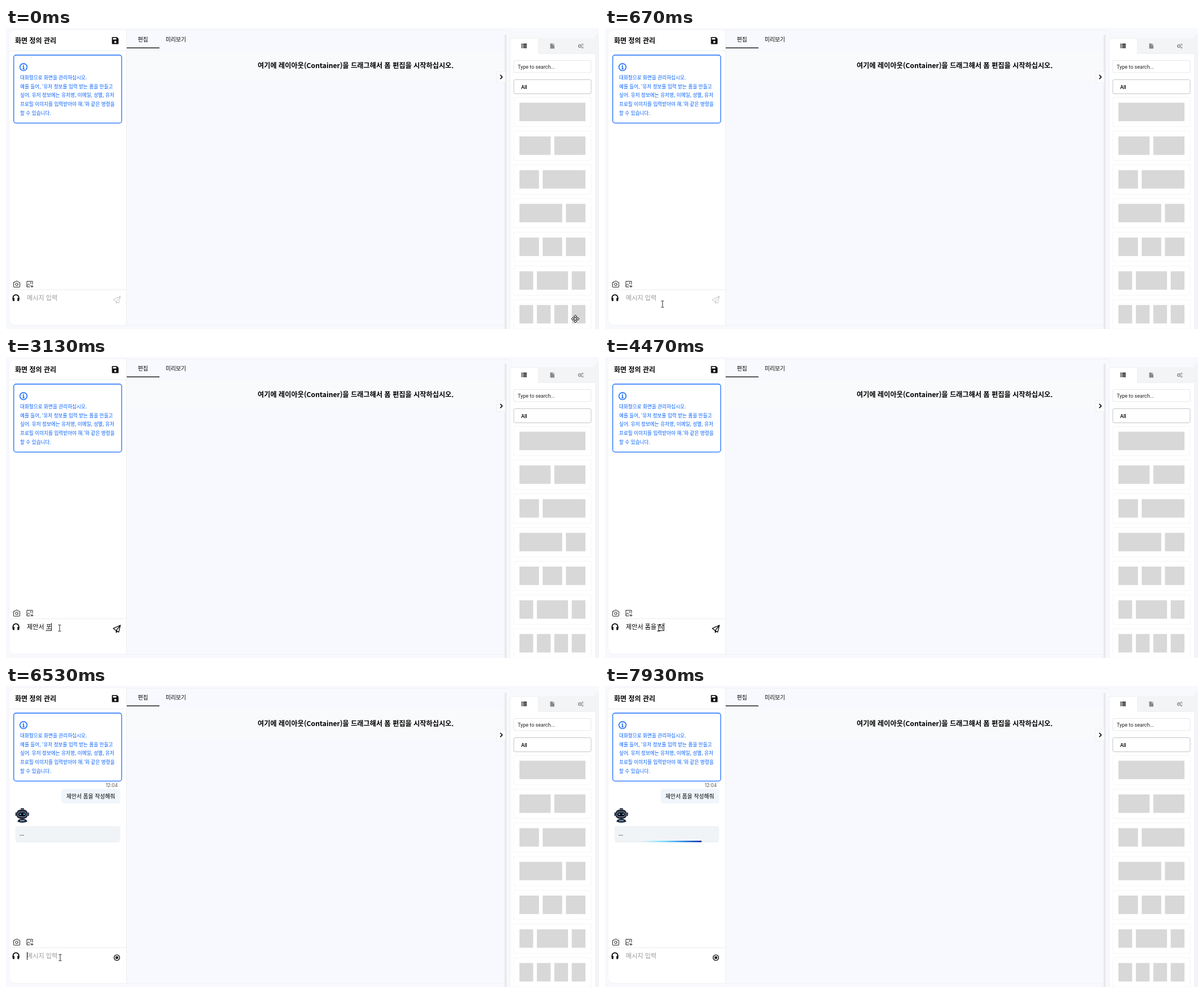
An HTML page that plays this animation: 1051 px wide and 533 px high, repeating every 8000 ms.

```html
<!DOCTYPE html>
<html lang="ko">
<head>
<meta charset="utf-8">
<style>
  html, body { margin: 0; width: 100%; height: 100%; overflow: hidden; background: #f8f9fc; }
  svg { display: block; width: 1051px; height: 533px; }
  text { font-family: "Noto Sans CJK KR", "Noto Sans KR", sans-serif; white-space: pre; fill: #000; }
  .bold { font-size: 12.2px; font-weight: 700; }
  .title { font-size: 12px; }
  .tab { font-size: 9.8px; }
  .info { font-size: 8.65px; fill: #0560fd; }
  .entry { font-size: 11.1px; }
  .hint { font-size: 11.1px; font-weight: 300; fill: #999; }
  .latin { font: 9px Roboto, sans-serif; fill: #222; }
  .line { fill: none; stroke: #222; stroke-width: 1; stroke-linejoin: round; stroke-linecap: round; }
</style>
</head>
<body>
<svg viewBox="0 0 1051 533">
  <defs>
    <linearGradient id="glow">
      <stop offset="0" stop-color="#7fe6ff" stop-opacity="0"/>
      <stop offset=".4" stop-color="#6fdcfa"/>
      <stop offset=".72" stop-color="#1f7fe0"/>
      <stop offset="1" stop-color="#0a1fa8"/>
    </linearGradient>
    <linearGradient id="shade">
      <stop offset="0" stop-color="#dfe1e6" stop-opacity="0"/>
      <stop offset="1" stop-color="#dfe1e6"/>
    </linearGradient>
  </defs>

  <!-- page and chat column -->
  <rect x="6" y="4" width="890" height="522.5" rx="10" fill="#f8f9fe" stroke="#f0f1f4"/>
  <path d="M213 4H16a10 10 0 0 0-10 10V516a10 10 0 0 0 10 10H213z" fill="#fff"/>
  <path d="M213.5 4V526M6 40.5H213M6 463.5H213" stroke="#eceef1" fill="none"/>
  <rect x="214" y="42" width="672" height="50" fill="#f9fafc"/>
  <text class="bold title" x="16" y="27.3">화면 정의 관리</text>
  <path d="M189 16h7.500l3 3v8.500q0 1-1 1h-9.500q-1.300 0-1.300-1.300v-10q0-1.200 1.300-1.200z" fill="#111"/>
  <path d="M189.500 17.600h6v2.800h-6z" fill="#fff"/>
  <circle cx="193.700" cy="24.700" r="1.900" fill="#fff"/>

  <rect x="13.700" y="48" width="191.300" height="120.300" rx="4" fill="#fff" stroke="#1a6dfd" stroke-width="1.300"/>
  <g fill="none" stroke="#0560fd" stroke-width="1.400">
    <circle cx="31" cy="69.300" r="6.300"/>
    <path d="M29.500 68.300h1.700v4M29.300 72.500h3.600M31 65.300v1.500"/>
  </g>
  <g id="info"></g>

  <g class="line">
    <path d="M14.500 450h1.800l1.200-1.800h3l1.200 1.800h1.800q1 0 1 1v7q0 1-1 1h-9q-1 0-1-1v-7q0-1 1-1z"/>
    <circle cx="19" cy="454" r="2.300"/>
    <path d="M42 458.500h-5v-10h10v5M37 456.500l3-3 3 2.500M44 457.500h4M46 455.500v4"/>
    <circle cx="43.700" cy="451.500" r=".8"/>
  </g>
  <path d="M12.500 480v-2.500a5 5 0 0 1 10.200 0v2.500" fill="none" stroke="#000" stroke-width="1.800"/>
  <path d="M11.700 478h3.200v5.500h-1.500q-1.700 0-1.700-1.500zM23.500 478h-3.200v5.500h1.500q1.700 0 1.700-1.500z" fill="#000"/>

  <!-- editor -->
  <text class="tab" x="233.700" y="24">편집</text>
  <text class="tab" x="283" y="24">미리보기</text>
  <path d="M214 35.200h58" stroke="#222" stroke-width="1.500"/>
  <text class="bold" x="446" y="71.300">여기에 레이아웃(Container)을 드래그해서 폼 편집을 시작하십시오.</text>

  <!-- layout panel -->
  <rect x="882" y="12" width="5" height="521" fill="url(#shade)"/>
  <rect x="887" y="12" width="157" height="521" fill="#f8f9fb"/>
  <rect x="1044" y="12" width="7" height="521" fill="#f3f4f8"/>
  <rect x="870" y="77" width="15" height="20" fill="#fbfbfc" stroke="#eeeff1"/>
  <path d="M876 83l3.500 3.700-3.500 3.700" fill="none" stroke="#111" stroke-width="1.700"/>
  <rect x="943" y="18" width="101" height="28" fill="#f3f4f6"/>
  <path d="M893 18h50v27.500h101V533H893z" fill="#fff"/>
  <path d="M893.500 533V18.500h50v27h101" fill="none" stroke="#eeeff1"/>
  <path d="M913.500 28.800h2M913.500 31.700h2M913.500 34.600h2M916.500 28.800h6.500M916.500 31.700h6.500M916.500 34.600h6.500" stroke="#111" stroke-width="1.900"/>
  <path d="M964.500 27.500h4.500v3h3v6h-7.500zM969.700 27.300l2.500 2.500h-2.500z" fill="#888"/>
  <g fill="none" stroke="#888">
    <circle cx="1017" cy="32" r="2.300" stroke-width="1.500"/>
    <circle cx="1021.700" cy="29.300" r="1.300"/>
    <circle cx="1021.700" cy="34.700" r="1.300"/>
  </g>
  <rect x="900" y="57.500" width="137" height="21.500" rx="2" fill="#fff" stroke="#e6e7e9"/>
  <text class="latin" x="907" y="71.500">Type to search...</text>
  <rect x="900" y="91.500" width="137" height="25" rx="2.500" fill="#fff" stroke="#c4c5c8"/>
  <text class="latin" x="913" y="107.500" style="fill:#000;font-weight:500">All</text>
  <g id="cards"></g>

  <!-- conversation -->
  <g id="sent">
    <text x="176.700" y="179.300" style="font:8.300px Inter,sans-serif;fill:#555">12:04</text>
    <rect x="98.500" y="182" width="104" height="26" rx="4" fill="#f0f6fb"/>
    <text x="107" y="198.600" style="font-size:9.800px">제안서 폼을 작성해줘</text>
  </g>
  <g id="reply">
    <path d="M22 237q7-4 14 0l2 3q-9 4-18 0z" fill="#1a2233"/>
    <rect x="18.500" y="219" width="20" height="16" rx="7" fill="#202839"/>
    <rect x="21" y="223" width="15" height="8.500" rx="4" fill="#0a0f1c" stroke="#b8c6d6" stroke-width=".8"/>
    <path d="M24 227h2.500M31 227h2.500" stroke="#56cdf7" stroke-width="2"/>
    <path d="M17.700 224v6M39.700 224v6M26 217.500h6" stroke="#10182a" stroke-width="1.800"/>
    <path d="M25 238.500h8" stroke="#9cc9ea" stroke-width="1.500"/>
    <rect x="16.500" y="248" width="186" height="28" rx="4.500" fill="#f1f4f7"/>
    <path d="M18 276h183" stroke="#e3e5e8" stroke-width=".8"/>
    <text x="24" y="265" style="font-size:10px">...</text>
    <rect id="bar" y="274" height="2.500" fill="url(#glow)"/>
  </g>

  <!-- message entry -->
  <text id="hint" class="hint" x="37" y="482">메시지 입력</text>
  <text id="entry" class="entry" x="37" y="482"></text>
  <path id="under" stroke="#111" stroke-width="1"/>
  <path id="caret" stroke="#111" stroke-width="1"/>
  <path id="send" class="line" d="M190.300 480.700l12.400-5.700-3 12.300-4.400-2.900zM195.300 484.400l7.400-9.400M195.300 484.400v3.400l2-2"/>
  <g id="stop">
    <circle cx="196.500" cy="481" r="4.900" fill="#fff" stroke="#111" stroke-width="1.400"/>
    <rect x="194.200" y="478.700" width="4.600" height="4.600" rx=".8" fill="#111"/>
  </g>

  <!-- pointers, centred on 0,0 -->
  <g id="move" fill="#fff" stroke="#111" stroke-width="1">
    <path d="M0-7l2.700 3H1v3h3v-1.700L7 0 4 2.700V1H1v3h1.700L0 7-2.700 4H-1V1h-3v1.700L-7 0l3-2.700V-1h3v-3h-1.700z"/>
  </g>
  <path id="arrow" d="M0 0v12l2.800-2.600 1.900 4.300 1.900-.8-1.900-4.200h3.800z" fill="#fff" stroke="#111" stroke-width=".9"/>
  <path id="beam" d="M-2.500-5.500h2l.5.500.5-.5h2M-2.500 5.500h2l.5-.5.5.5h2M0-5V5" fill="none" stroke="#222" stroke-width="1"/>
</svg>
<script>
const LOOP = 8000, SEND = 6330, REPLY = 6400, BLINK = 533;
const $ = id => document.getElementById(id);
const show = (id, on) => $(id).style.display = on ? '' : 'none';

$('info').innerHTML = [
  '대화형으로 화면을 관리하십시오.',
  "예를 들어, '유저 정보를 입력 받는 폼을 만들고",
  '싶어. 유저 정보에는 유저명, 이메일, 성별, 유저',
  "프로필 이미지를 입력받아야 해.'와 같은 명령을",
  '할 수 있습니다.'
].map((s, i) => `<text class="info" x="25" y="${91.3 + i * 15.55}">${s}</text>`).join('');

// Column spans on a 12-unit grid
const UNIT = 10.3, GAP = 6.6;
$('cards').innerHTML = [[12], [6, 6], [4, 8], [8, 4], [4, 4, 4], [3, 6, 3], [3, 3, 3, 3]].map((row, i) => {
  const y = 132.3 + i * 59.7;
  let x = 910;
  return `<rect x="900" y="${y - 9.5}" width="137" height="52" fill="none" stroke="#f5f5f6"/>` + row.map(n => {
    const cell = `<rect x="${x}" y="${y}" width="${n * UNIT - GAP}" height="32.7" fill="#d8d8d8"/>`;
    x += n * UNIT;
    return cell;
  }).join('');
}).join('');

// Hangul composition: time and the text typed so far
const keys = [
  [930, ''], [1730, 'ㅈ'], [1870, '제'], [2000, '젱'], [2130, '제아'], [2200, '제안'],
  [2670, '제안ㅅ'], [2730, '제안서'], [2870, '제안서 '], [3070, '제안서 ㅍ'], [3130, '제안서 포'],
  [3330, '제안서 폼'], [3530, '제안서 폼ㅇ'], [3670, '제안서 폼으'], [3730, '제안서 폼을'],
  [4130, '제안서 폼을 '], [4200, '제안서 폼을 ㅈ'], [4330, '제안서 폼을 자'], [4470, '제안서 폼을 작'],
  [5200, '제안서 폼을 작ㅅ'], [5270, '제안서 폼을 작서'], [5330, '제안서 폼을 작성'],
  [5530, '제안서 폼을 작성ㅎ'], [5600, '제안서 폼을 작성해'], [5730, '제안서 폼을 작성햊'],
  [5870, '제안서 폼을 작성해주'], [5930, '제안서 폼을 작성해줘'], [SEND, '']
];

const path = [
  [70, 1009, 515], [270, 860, 519], [530, 250, 505], [670, 102, 489], [800, 95, 480],
  [6330, 95, 480], [6400, 96, 481], [7000, 96, 481], [7130, 97, 499], [7330, 97, 545]
];
// Left and right ends of the progress streak within its cycle
const streak = [[40, 16, 16], [150, 16, 80], [330, 62, 171], [400, 102, 179], [550, 160, 202], [700, 202, 202]];

function along(points, t) {
  const i = points.findIndex(p => p[0] > t);
  if (i < 0) return points[points.length - 1].slice(1);
  if (i === 0) return points[0].slice(1);
  const a = points[i - 1], b = points[i], k = (t - a[0]) / (b[0] - a[0]);
  return [1, 2].map(n => a[n] + (b[n] - a[n]) * k);
}

function drawEntry(t) {
  const key = keys.filter(k => k[0] <= t).pop();
  const text = key ? key[1] : '';
  $('entry').textContent = text;
  const end = 37 + (text ? $('entry').getComputedTextLength() : 0);
  const composing = text && !text.endsWith(' ');
  $('under').setAttribute('d', composing ? `M${end - 10.6} 484.5H${end}` : '');
  const lit = key && Math.floor((t - key[0]) / BLINK) % 2 === 0;
  const x = Math.floor(end) + .5;
  $('caret').setAttribute('d', lit ? `M${x} 471V485` : '');
  show('hint', !text);
  show('send', t < SEND);
  $('send').style.stroke = text ? '#000' : '#c4c4c4';
  $('send').style.strokeWidth = text ? 1.3 : 1;
  show('stop', t >= SEND);
}

function drawPointer(t) {
  const [x, y] = along(path, t);
  const kind = x > 890 ? 'move' : x > 190 ? 'arrow' : 'beam';
  for (const id of ['move', 'arrow', 'beam']) show(id, id === kind);
  $(kind).setAttribute('transform', `translate(${x} ${y})`);
}

function draw(t) {
  drawEntry(t);
  drawPointer(t);
  show('sent', t >= SEND);
  show('reply', t >= REPLY);
  const [left, right] = along(streak, (t + 400) % 1000);
  $('bar').setAttribute('x', left);
  $('bar').setAttribute('width', right - left);
}

const start = performance.now();
function tick() {
  draw((performance.now() - start) % LOOP);
  requestAnimationFrame(tick);
}
tick();
</script>
</body>
</html>
```
